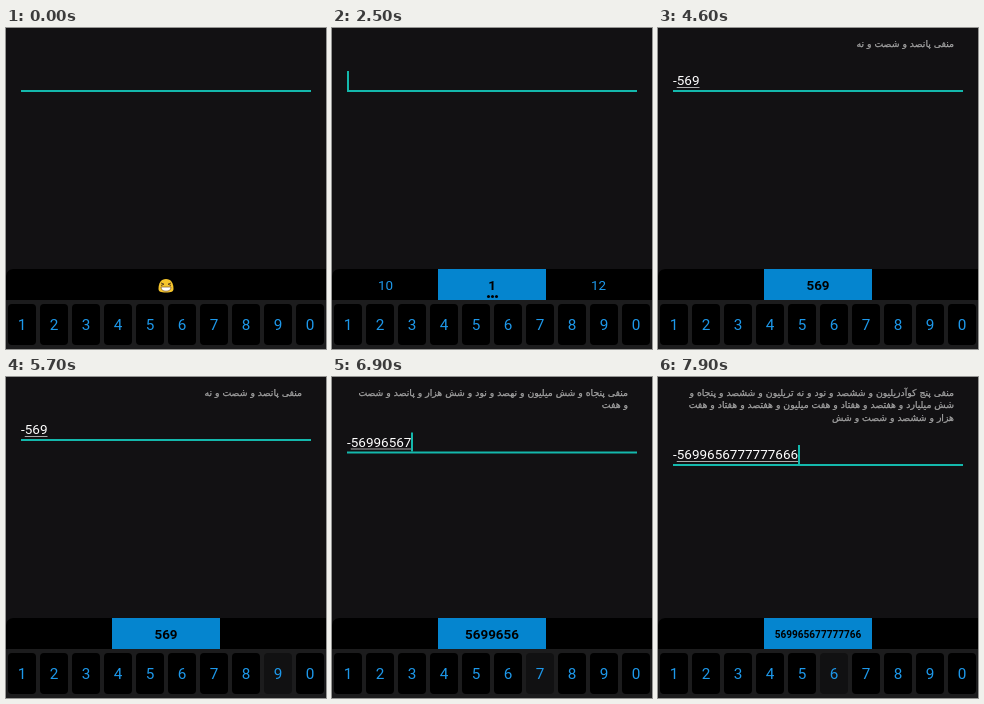
These frames come from a looping animation (320 px wide and 321 px high, 8000 ms). An HTML page:

```html
<!DOCTYPE html>
<html lang="fa">
<head>
<meta charset="utf-8">
<title>Number to Persian words</title>
<style>
  html, body { margin: 0; width: 100%; height: 100%; overflow: hidden; background: #121113; }
  #stage { position: relative; width: 320px; height: 321px; overflow: hidden; font-family: Roboto, sans-serif; }
  #stage div { position: absolute; box-sizing: border-box; }
  #words { top: 9.5px; right: 24px; width: 274px; direction: rtl; color: #a3a3a3;
           font: 9.3px/12.5px "DejaVu Sans", sans-serif; -webkit-text-stroke: .25px; }
  #field { left: 15px; top: 42px; width: 290px; height: 22px; border-bottom: 2px solid #14b8ac; }
  #entry { left: 0; top: 2px; height: 16px; font-size: 13.5px; line-height: 16px; color: #fff; white-space: nowrap; }
  #digits { text-decoration: underline 1px #aaa; text-underline-offset: 2px; }
  #caret { left: 100%; top: -1px; width: 2px; height: 19px; margin-left: -.5px; background: #14b8ac; }
  #board { left: 0; top: 241px; width: 320px; height: 80px; background: #1c1c1d; border-radius: 7px 0 0; overflow: hidden; }
  #bar { left: 0; top: 0; width: 320px; height: 31px; background: #000; }
  .pick { top: 0; width: 107px; height: 31px; line-height: 33px; text-align: center; font-size: 13.4px; color: #1d98ea; }
  #left { left: 0; }
  #right { left: 213px; }
  #main { left: 106px; width: 108px; color: #000; font-weight: 700; background: #0585cf; }
  #dots { left: 155px; top: 26px; width: 3px; height: 3px; border-radius: 50%; background: #000;
          box-shadow: 4px 0 #000, 8px 0 #000; }
  #face { position: absolute; left: 152px; top: 9px; }
  .key { top: 35px; width: 28px; height: 41px; border-radius: 4px; background: #000; color: #1d98ea;
         font-size: 15.3px; line-height: 43px; text-align: center; }
</style>
</head>
<body>
<div id="stage">
  <div id="words"></div>
  <div id="field">
    <div id="entry"><span id="sign"></span><span id="digits"></span><div id="caret"></div></div>
  </div>
  <div id="board">
    <div id="bar">
      <div class="pick" id="left"></div>
      <div class="pick" id="right"></div>
      <div class="pick" id="main"></div>
      <div id="dots"></div>
      <svg id="face" width="16" height="15" viewBox="0 0 16 15">
        <path d="M.5 11C.5 5 3 1 8 1s7.500 4 7.500 10c0 2.500-2 3.500-7.500 3.500S.5 13.500.5 11z" fill="#f5c52c"/>
        <path d="M3 5l3 1.200-3 1.300M13 5l-3 1.200 3 1.300" fill="none" stroke="#5d4320"/>
        <path d="M3 9h10c0 3-2 4.200-5 4.200S3 12 3 9z" fill="#fff" stroke="#7a5322" stroke-width=".7"/>
      </svg>
    </div>
  </div>
</div>
<script>
const LOOP = 8000, LAG = 90, PRESS = 100;
const $ = id => document.getElementById(id);

// Time of each edit and the text it leaves in the field.
const edits = [[-600, ''], [780, '1'], [1080, '12'], [1350, '123'], [2080, '12'], [2280, '1'], [2490, ''],
  [3190, '-'], [3580, '-5'], [3780, '-56'], [4090, '-569']];
const typed = [[5780, 9], [6080, 6], [6390, 5], [6680, 6], [6880, 7], [6980, 7], [7080, 7], [7180, 7],
  [7280, 7], [7590, 7], [7690, 6], [7790, 6], [7890, 6], [7990, 6]];
for (const [t, digit] of typed) edits.push([t, edits.at(-1)[1] + digit]);

const ones = ' یک دو سه چهار پنج شش هفت هشت نه ده یازده دوازده سیزده چهارده پانزده شانزده هفده هجده نوزده'.split(' ');
const tens = '  بیست سی چهل پنجاه شصت هفتاد هشتاد نود'.split(' ');
const hundreds = ' صد دویست سیصد چهارصد پانصد ششصد هفتصد هشتصد نهصد'.split(' ');
const scales = ' هزار میلیون میلیارد تریلیون کوآدریلیون'.split(' ');
const join = parts => parts.filter(Boolean).join(' و ');

function triple(n) {
  const low = n % 100;
  const rest = low < 20 ? [ones[low]] : [tens[low / 10 | 0], ones[low % 10]];
  return join([hundreds[n / 100 | 0], ...rest]);
}

function spell(text) {
  const digits = text.replace('-', '');
  if (!digits) return '';
  const groups = Number(digits).toLocaleString('en-US').split(',');
  const parts = groups.map((g, i) => +g && `${triple(+g)} ${scales[groups.length - 1 - i]}`.trim());
  return (text[0] === '-' ? 'منفی ' : '') + join(parts);
}

const editAt = t => edits.findLast(e => e[0] <= t) || edits[0];

const keys = [...'1234567890'].map((digit, i) => {
  const key = document.createElement('div');
  key.className = 'key';
  key.textContent = digit;
  key.style.left = 2 + 32 * i + 'px';
  return $('board').appendChild(key);
});

function showPicks(text) {
  const digits = text.replace('-', '');
  const sides = { 1: ['10', '12'], 12: ['12345', '123456'], 123: ['12345', '123456'] }[text];
  [$('left').textContent, $('right').textContent] = sides || ['', ''];
  $('main').textContent = digits;
  $('main').style.fontSize = Math.min(13.4, 151 / digits.length) + 'px';
  $('main').hidden = !digits;
  $('dots').hidden = !sides;
  $('face').style.display = text ? 'none' : '';
}

function draw(now) {
  const t = now % LOOP;
  const [since, text] = editAt(t);
  const next = edits.find(e => e[0] > t);
  const pressed = next && next[0] - t <= PRESS && next[1].length > text.length && next[1].at(-1);

  $('words').textContent = spell(text);
  const lines = Math.max(1, Math.round($('words').offsetHeight / 12.5));
  $('field').style.transform = `translateY(${12.5 * (lines - 1)}px)`;
  $('sign').textContent = text[0] === '-' ? '-' : '';
  $('digits').textContent = text.replace('-', '');
  $('caret').hidden = (t - since) % 1000 >= 500;
  showPicks(editAt(t - LAG)[1]);
  for (const key of keys) key.style.background = key.textContent === pressed ? '#111112' : '#000';
  requestAnimationFrame(draw);
}
requestAnimationFrame(draw);
</script>
</body>
</html>
```
